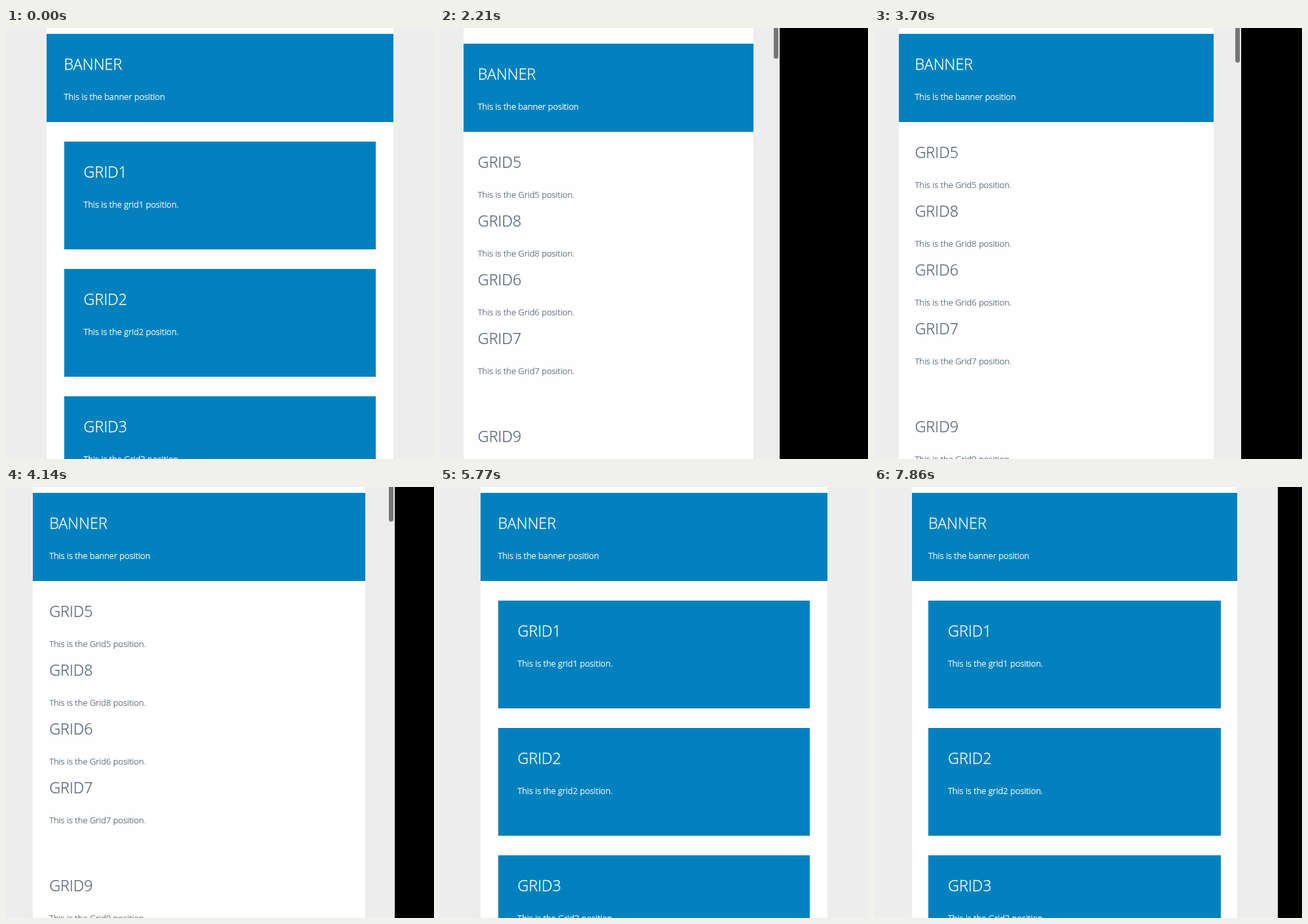
These frames come from a looping animation (654 px wide and 660 px high, 8 s). An HTML page:

```html
<!DOCTYPE html>
<html lang="en">
<head>
<meta charset="utf-8">
<title>Responsive grid</title>
<style>
  html, body { margin: 0; width: 100%; height: 100%; overflow: hidden; background: #000; }
  svg { display: block; width: 654px; height: 660px; }
  rect { shape-rendering: crispEdges; }
  text { font-family: "Open Sans", "Noto Sans", sans-serif; font-weight: 300; }
  .title { font-size: 23.4px; }
  .body { font-size: 13px; }
  .light { fill: #fff; stroke: #fff; stroke-width: 0.35px; }
  .dark { fill: #4f5b69; stroke: #4f5b69; stroke-width: 0.2px; }
</style>
</head>
<body>
<svg id="stage" viewBox="0 0 654 660"></svg>
<script>
const LOOP = 8000;
const BLUE = '#0081bd';
const stage = document.getElementById('stage');

// Each drag: start, mean step length in ms, then the window width after every step.
const drags = [
  [900, 146, [654, 643, 621, 597, 590, 585]],
  [1920, 147.5, [572, 547, 519, 496, 485]],
  [3100, 148.5, [498, 513, 530, 546, 561, 574, 585, 594]],
  [4290, 147, [602, 611, 620, 628.9, 638, 646, 652, 656]],
  [5470, 150, [657, 657.5, 658]],
  [7270, 147.5, [654, 648, 639, 628, 617]]
];

function windowWidth(time) {
  let width = 658;
  for (const [start, step, widths] of drags) {
    if (time < start - 1) break;
    // The small lead absorbs uneven step lengths.
    const index = Math.floor((time - start) / step + 0.1);
    width = widths[Math.min(index, widths.length - 1)];
  }
  return width;
}

function set(node, attrs) {
  for (const key in attrs) node.setAttribute(key, attrs[key]);
}

function add(parent, name, attrs = {}, content = '') {
  const node = document.createElementNS('http://www.w3.org/2000/svg', name);
  set(node, attrs);
  node.textContent = content;
  parent.appendChild(node);
  return node;
}

function addCopy(parent, name, sentence, y, tone) {
  const group = add(parent, 'g');
  add(group, 'text', { class: `title ${tone}`, y }, name);
  add(group, 'text', { class: `body ${tone}`, y: y + 46 }, sentence);
  return group;
}

const backdrop = add(stage, 'rect', { height: 660, fill: '#ededed' });
const sheet = add(stage, 'rect', { height: 660, fill: '#fefefe' });
const content = add(stage, 'g');
const banner = add(content, 'rect', { y: 9, height: 135, fill: BLUE });
const bannerCopy = addCopy(content, 'BANNER', 'This is the banner position', 64, 'light');

const wideGrid = add(content, 'g');
const cards = ['grid1', 'grid2', 'Grid3'].map((name, i) => {
  const y = 174 + 195 * i;
  return {
    box: add(wideGrid, 'rect', { y, height: 165, fill: BLUE }),
    copy: addCopy(wideGrid, name.toUpperCase(), `This is the ${name} position.`, y + 55, 'light')
  };
});

const narrowGrid = add(content, 'g');
[[5, 199], [8, 289], [6, 379], [7, 469], [9, 619]].forEach(([n, y]) =>
  addCopy(narrowGrid, `GRID${n}`, `This is the Grid${n} position.`, y, 'dark'));

const scrollbar = add(stage, 'rect', {
  y: -20, width: 7, rx: 3.5, fill: '#757575', style: 'shape-rendering:auto'
});

function shiftX(node, x) {
  node.setAttribute('transform', `translate(${x} 0)`);
}

function span(node, left, right) {
  set(node, { x: Math.round(left), width: Math.round(right) - Math.round(left) });
}

function draw(time) {
  const width = windowWidth(time);
  const wide = width > 600;
  const short = width < 540;
  const page = width - 4;
  const left = page * (wide ? 0.095 : 0.069);
  const right = page - left;
  const pad = (right - left) * 0.05;

  backdrop.setAttribute('width', Math.floor(width));
  span(sheet, left, right);
  span(banner, left, right);
  shiftX(bannerCopy, left + pad);
  shiftX(narrowGrid, left + pad);
  for (const { box, copy } of cards) {
    span(box, left + pad, right - pad);
    shiftX(copy, left + pad + 30);
  }
  wideGrid.setAttribute('display', wide ? 'inline' : 'none');
  narrowGrid.setAttribute('display', wide ? 'none' : 'inline');
  content.setAttribute('transform', `translate(0 ${short ? 15 : 0})`);
  set(scrollbar, {
    x: page - 5,
    height: short ? 67 : 73,
    display: wide ? 'none' : 'inline'
  });
}

const began = performance.now();
function tick() {
  draw((performance.now() - began) % LOOP);
  requestAnimationFrame(tick);
}
draw(0);
requestAnimationFrame(tick);
</script>
</body>
</html>
```
